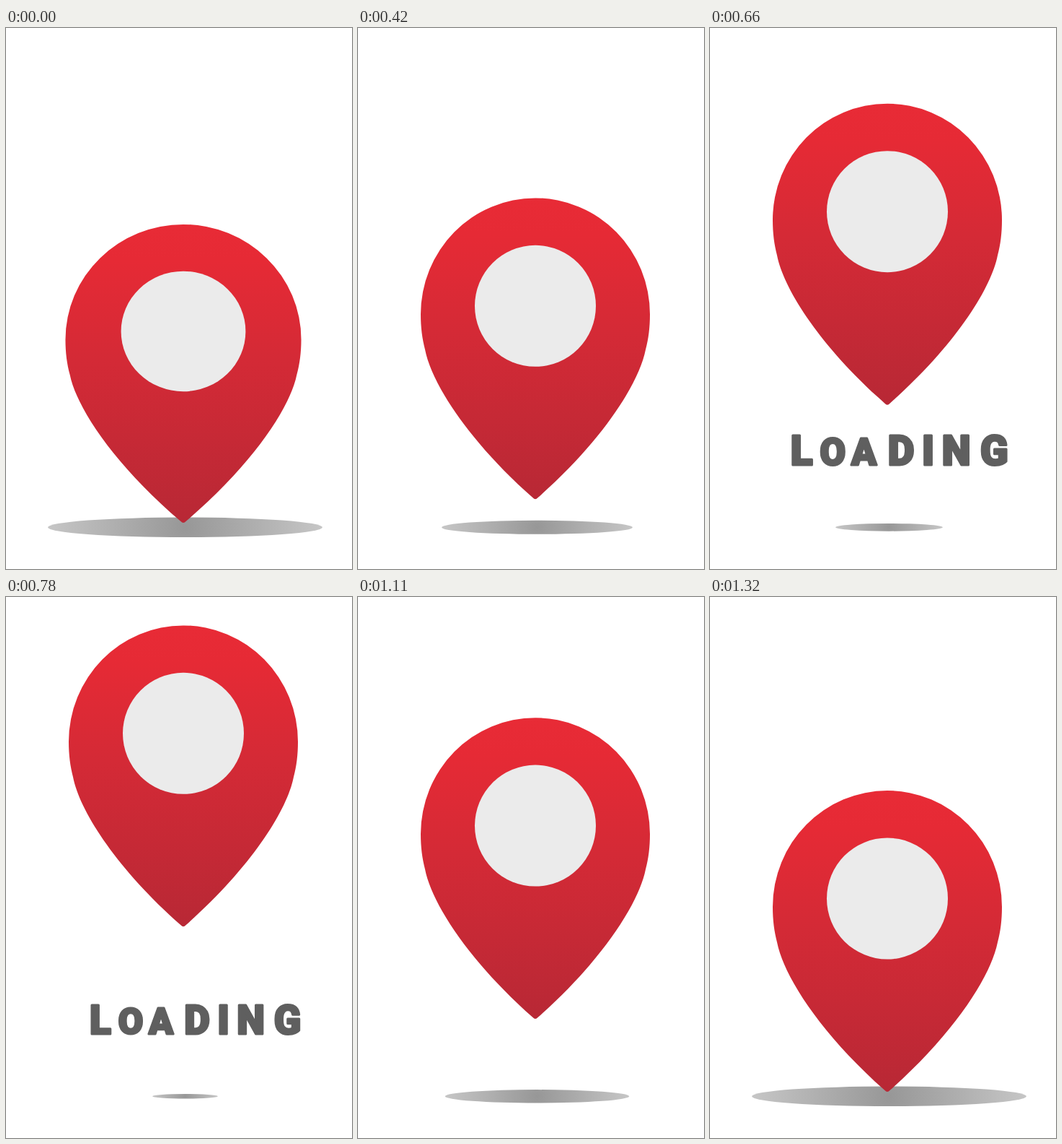
Recreate the animation shown at these times as an HTML page. Size 480 by 749 pixels, loop 1350 ms.

```html
<!DOCTYPE html>
<html lang="en">
<head>
<meta charset="utf-8">
<title>Loading pin</title>
<style>
  html, body { margin: 0; height: 100%; overflow: hidden; background: #fff; }
  svg { display: block; width: 100%; height: 100%; }
  text {
    font: 900 55px Roboto, sans-serif;
    text-anchor: middle;
    fill: #5f5f5f;
    stroke: #5f5f5f;
    stroke-width: 3;
    stroke-linejoin: round;
  }
  .small { font-size: 50px; }
</style>
</head>
<body>
<svg viewBox="0 0 480 749">
  <defs>
    <linearGradient id="red" x2="0" y2="1">
      <stop stop-color="#e82b36"/>
      <stop offset=".12" stop-color="#e62a35"/>
      <stop offset=".45" stop-color="#d42a36"/>
      <stop offset="1" stop-color="#b82835"/>
    </linearGradient>
    <radialGradient id="grey" gradientUnits="userSpaceOnUse" cx="0" cy="0" r="190.5">
      <stop stop-color="#979797"/>
      <stop offset="1" stop-color="#c6c6c6"/>
    </radialGradient>
  </defs>
  <ellipse id="shadow" rx="190.5" ry="13.7" fill="url(#grey)"/>
  <g id="label">
    <text x="131 173 215 265 301.5 339.5 390.5" y="604.5">L<tspan class="small">OA</tspan>DING</text>
  </g>
  <!-- The tip of the pin is the origin -->
  <g id="pin">
    <path fill="url(#red)" d="M-159-256A159 161 0 0 1 159-256C159-238 157-222 153-207
      C144-161 94-82 3.500-2Q0 2-3.500-2C-94-82-144-161-153-207C-157-222-159-238-159-256Z"/>
    <circle cy="-267.500" r="84" fill="#ebebeb"/>
  </g>
</svg>
<script>
const LOOP = 1350, STEP = 30;
const [shadow, label, pin] = ['shadow', 'label', 'pin'].map(id => document.getElementById(id));

// Keys are [time, value] pairs, joined by straight lines.
const squashKeys = [[-30, 0], [180, 1], [330, 0]];
const liftKeys = [[360, 0], [810, 245], [1320, 0]];
const shadowKeys = [[180, 1], [810, 0.2], [1320, 1]];
const labelKeys = [[570, 0], [660, 1.03], [690, 1], [1020, 1], [1080, 0]];

function track(keys, t) {
  const next = keys.findIndex(key => key[0] > t);
  if (next < 0) return keys[keys.length - 1][1];
  if (next === 0) return keys[0][1];
  const [t0, v0] = keys[next - 1], [t1, v1] = keys[next];
  return v0 + (v1 - v0) * (t - t0) / (t1 - t0);
}

function place(node, x, y, sx, sy = sx) {
  node.setAttribute('transform', `translate(${x} ${y}) scale(${sx} ${sy})`);
}

function draw() {
  const t = Math.floor(performance.now() % LOOP / STEP) * STEP;
  const squash = track(squashKeys, t);
  const size = track(labelKeys, t);
  place(pin, 246, 685 - track(liftKeys, t), 1 + 0.2 * squash, 1 - 0.065 * squash);
  place(shadow, 248.5, 691.3, track(shadowKeys, t));
  place(label, 264 * (1 - size), 585 * (1 - size), size);
  label.style.display = size ? '' : 'none';
  requestAnimationFrame(draw);
}
draw();
</script>
</body>
</html>
```
